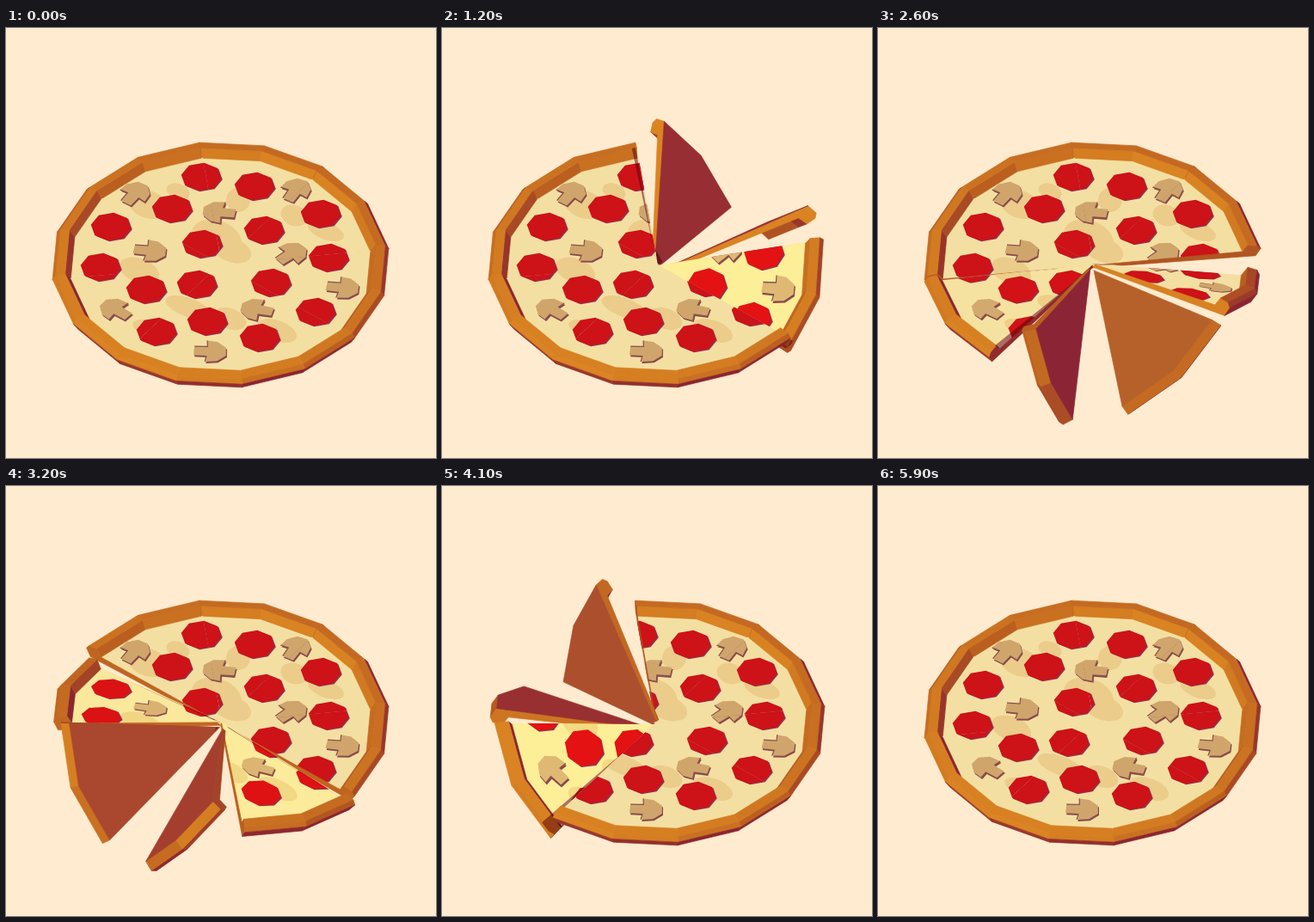
These frames come from a looping animation (500 by 500 pixels, 6000 ms). An HTML page with a canvas:

```html
<!DOCTYPE html>
<html>
<head>
<meta charset="utf-8">
<style>
  html, body { margin: 0; height: 100%; overflow: hidden; background: #ffebd0; }
  canvas { display: block; }
</style>
</head>
<body>
<canvas id="stage" width="500" height="500"></canvas>
<script>
const ctx = document.getElementById('stage').getContext('2d');
const RAD = Math.PI / 180, CX = 249.5, CY = 276, RX = 197, RY = 141, RH = 137;
const PIVOT = 0.035;   // depth of the turning axis below the cheese

// World axes: x right, y up, z towards the viewer
const unit = v => v.map(c => c / Math.hypot(...v));
const SUN = unit([-0.35, 0.8, 0.5]), FILL = unit([0.5, 0.75, 0.4]);

// Crust profile as [radius, height], from the underside over the rim to the cheese
const PROFILE = [[.97, -.045], [1, .012], [.982, .04], [.925, .052], [.892, 0]];
const CRUST = ['#8a2430', '#b65b20', '#e08a22'];
const BASE = ['#8a2436', '#9f3630', '#b8652a'];

const PEPPERONI = [[227,173],[289,184],[366,216],[193,210],[122,231],[300,235],[228,251],[375,267],
  [110,278],[222,298],[308,296],[163,304],[360,330],[234,341],[175,353],[295,360]];
// x, y, turn in degrees
const MUSHROOMS = [[150,192,35],[247,214,-80],[337,188,30],[168,259,100],[332,262,50],
  [127,327,-50],[291,327,-75],[392,302,100],[238,376,95]];
// x, y, half width, half height
const STAINS = [[245,244,30,20],[262,258,24,14],[165,205,24,16],[200,190,14,9],[372,236,22,10],[335,218,16,12],
  [155,282,24,14],[212,325,28,11],[260,338,20,12],[315,352,24,12],[172,352,26,10],[270,200,14,14]];

const add = (a, b) => a.map((v, i) => v + b[i]);
const mul = (a, k) => a.map(v => v * k);
const dot = (a, b) => a[0] * b[0] + a[1] * b[1] + a[2] * b[2];
const cross = (a, b) => [a[1]*b[2] - a[2]*b[1], a[2]*b[0] - a[0]*b[2], a[0]*b[1] - a[1]*b[0]];
const clamp = (v, lo = 0, hi = 1) => Math.min(hi, Math.max(lo, v));
const project = p => [CX + RX * p[0], CY + RY * p[2] - RH * p[1]];

function mix(a, b, k) {
  const part = (c, i) => parseInt(c.slice(i, i + 2), 16);
  return 'rgb(' + [1, 3, 5].map(i => Math.round(part(a, i) + (part(b, i) - part(a, i)) * k)) + ')';
}
function ramp(colors, k) {
  k = clamp(k) * 2;
  return k < 1 ? mix(colors[0], colors[1], k) : mix(colors[1], colors[2], k - 1);
}
function trace(points) {
  points.forEach(([x, y], i) => i ? ctx.lineTo(x, y) : ctx.moveTo(x, y));
  ctx.closePath();
}
function fill(points, color) {
  ctx.beginPath();
  trace(points);
  ctx.fillStyle = color;
  ctx.fill();
}
function normalOf(points) {
  let n = [0, 0, 0];
  points.forEach((p, i) => n = add(n, cross(p, points[(i + 1) % points.length])));
  return unit(mul(n, -1));
}
const facesCamera = n => 0.716 * n[1] + 0.698 * n[2] > 0;

function face(points, colors) {
  const n = normalOf(points);
  if (!facesCamera(n)) return;
  const color = ramp(colors, dot(n, SUN));
  fill(points.map(project), color);
  ctx.strokeStyle = color;
  ctx.lineWidth = 0.7;
  ctx.stroke();
}

function turnAt(i, t) {
  const u = clamp((t - 935 - 500 * i) / 900, -1, 1);
  return -Math.PI * (1 + 1.03 * u + 0.44 * u ** 3 - 0.47 * u ** 5);
}

function makeSlice(i, t) {
  const angle = (15.2 + 45 * i) * RAD, turn = turnAt(i, t);
  const s = Math.sin(turn), c = Math.cos(turn);
  const axis = [Math.sin(angle), 0, -Math.cos(angle)];
  const side = [Math.cos(angle), 0, Math.sin(angle)];
  const lateral = add(mul(side, c), [0, s, 0]);
  const up = add([0, c, 0], mul(side, -s));
  const origin = mul(add(up, [0, -1, 0]), PIVOT);
  const at = (r, h, k) => [mul(axis, r * Math.cos(k * 22.5 * RAD)),
    mul(lateral, r * Math.sin(k * 22.5 * RAD)), mul(up, h)].reduce(add, origin);
  const sector = (r, h, tip = h) => [at(0, tip, 0), at(r, h, -1), at(r, h, 0), at(r, h, 1)];
  return { axis, side, lateral, up, origin, at, sector, tilt: Math.abs(s) };
}

function drawPepperoni([x, y], bright) {
  const disc = (dx, dy) => Array.from({ length: 8 }, (_, k) =>
    [x + dx + 23.5 * Math.cos((k * 45 + 8) * RAD), y + dy + 16.5 * Math.sin((k * 45 + 8) * RAD)]);
  fill(disc(1.5, 1), '#943050');
  fill(disc(0, 0), mix('#cd1218', '#e41212', bright));
}

function drawMushroom([x, y, turn], bright) {
  const shape = [[-16,5],[-15,-6],[-7,-16],[5,-17],[14,-8],[16,5],[7,4],[7,18],[-6,18],[-7,4]];
  const a = turn * RAD;
  const place = (dx, dy) => shape.map(([px, py]) => [
    x + dx + 1.08 * (px * Math.cos(a) - py * Math.sin(a)),
    y + dy + 0.77 * (px * Math.sin(a) + py * Math.cos(a))]);
  fill(place(1.2, 2), '#8a4a4c');
  const top = place(0, 0);
  fill(top, mix('#cfa56c', '#dfb974', bright));
  ctx.beginPath();
  ctx.moveTo(...top[0]); ctx.lineTo(...top[9]); ctx.lineTo(...top[8]);
  ctx.moveTo(...top[5]); ctx.lineTo(...top[6]);
  ctx.strokeStyle = '#8a5048';
  ctx.lineWidth = 1.2;
  ctx.stroke();
}

function drawCheese(slice) {
  const { axis, side, lateral, up, origin, tilt } = slice;
  const bright = clamp(4 * tilt) * clamp((dot(up, SUN) - 0.5) * 6);
  ctx.save();
  // Slight overlap keeps seams closed
  const [tip, left, middle, right] = slice.sector(.892, 0), grow = mul(lateral, 0.008);
  ctx.beginPath();
  trace([add(tip, mul(axis, -0.02)), add(left, mul(grow, -1)), middle, add(right, grow)].map(project));
  ctx.clip();
  // Maps the flat pizza on the stage to the turned slice
  const [ox, oy] = project(origin);
  const column = d => {
    const p = project(add(mul(axis, dot(d, axis)), mul(lateral, dot(d, side))));
    return [p[0] - CX, p[1] - CY];
  };
  const ex = mul(column([1, 0, 0]), 1 / RX), ez = mul(column([0, 0, 1]), 1 / RY);
  ctx.transform(...ex, ...ez, ox - ex[0] * CX - ez[0] * CY, oy - ex[1] * CX - ez[1] * CY);
  ctx.fillStyle = mix('#f4dfa2', '#fdee98', bright);
  ctx.fillRect(40, 100, 420, 340);
  ctx.fillStyle = mix('#ebcc8a', '#f4da82', bright);
  for (const [x, y, w, h] of STAINS) {
    ctx.beginPath();
    ctx.ellipse(x, y, w, h, 0.35, 0, 7);
    ctx.fill();
  }
  PEPPERONI.forEach(p => drawPepperoni(p, bright));
  MUSHROOMS.forEach(m => drawMushroom(m, bright));
  ctx.restore();
}

// Keeps the part of a polygon that lies above the plane through base with normal n
function clipAbove(points, n, base) {
  const out = [], height = p => dot(p, n) - base;
  points.forEach((p, i) => {
    const q = points[(i + 1) % points.length], a = height(p), b = height(q);
    if (a > 0) out.push(p);
    if (a * b < 0) out.push(add(p, mul(add(q, mul(p, -1)), a / (a - b))));
  });
  return out;
}

function drawShadow(slice, slices, n, light) {
  const lit = dot(n, light), level = dot(slice.origin, n);
  if (lit < 0.03) return;
  ctx.save();
  ctx.beginPath();
  trace(slice.sector(.98, 0).map(project));
  ctx.clip();
  ctx.beginPath();
  for (const other of slices) {
    if (other === slice) continue;
    const shape = clipAbove(other.sector(.98, 0), n, level + 0.004);
    if (shape.length > 2) trace(shape.map(p => project(add(p, mul(light, (level - dot(p, n)) / lit)))));
  }
  ctx.globalCompositeOperation = 'multiply';
  ctx.fillStyle = '#b07a9a';
  ctx.fill();
  ctx.restore();
}

function drawSlice(slice, slices) {
  const { at, up } = slice, topSeen = facesCamera(up);
  const band = j => {
    const [[r1, h1], [r2, h2]] = [PROFILE[j], PROFILE[j + 1]];
    for (const k of [-1, 0]) face([at(r1, h1, k), at(r1, h1, k + 1), at(r2, h2, k + 1), at(r2, h2, k)], CRUST);
  };
  const outline = [[0, 0], ...PROFILE.slice().reverse(), [0, -.02]];
  const cuts = () => {
    face(outline.map(([r, h]) => at(r, h, 1)), CRUST);
    face(outline.map(([r, h]) => at(r, h, -1)).reverse(), CRUST);
  };
  if (topSeen) {
    drawCheese(slice);
    band(3);
    cuts();
    [2, 1, 0].forEach(band);
  } else {
    [3, 2, 1, 0].forEach(band);
    cuts();
    face(slice.sector(.97, -.045, -.02).reverse(), BASE);
  }
  for (const light of [SUN, FILL]) drawShadow(slice, slices, topSeen ? up : mul(up, -1), light);
}

function frame(now) {
  const t = Math.floor(now % 6000 / 100) * 100;
  ctx.fillStyle = '#ffebd0';
  ctx.fillRect(0, 0, 500, 500);
  const slices = Array.from({ length: 8 }, (_, i) => makeSlice(i, t));
  slices.slice().sort((a, b) => a.axis[2] - b.axis[2]).forEach(s => drawSlice(s, slices));
}

const start = performance.now();
function loop() {
  frame(performance.now() - start);
  requestAnimationFrame(loop);
}
loop();
</script>
</body>
</html>
```
